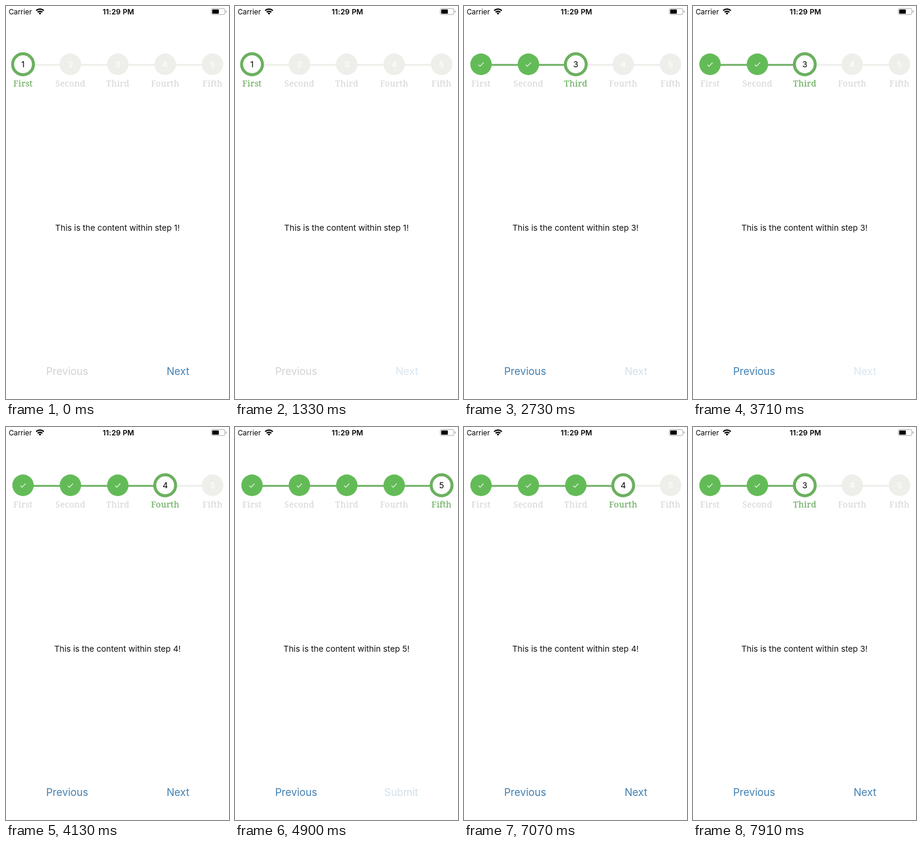
Recreate the animation shown at these times as an HTML page. Size 372 px wide and 654 px high, loop 8000 ms.

```html
<!DOCTYPE html>
<html lang="en">
<head>
<meta charset="utf-8">
<title>Progress steps</title>
<style>
  html, body { margin: 0; width: 100%; height: 100%; overflow: hidden; background: #fff; }
  svg { display: block; width: 100%; height: 100%; font-family: Inter, Roboto, sans-serif; }
  text { text-anchor: middle; }
  .status { font-size: 11.8px; text-anchor: start; }
  .clock { font-size: 12px; font-weight: 600; letter-spacing: .2px; }
  .content { font-size: 13.77px; fill: #111; }
  .button { font-size: 17.2px; fill: #417fb1; }
  .button.disabled { fill: #d2d2d2; }

  .line { fill: #eeeeea; }
  .line.done { fill: #6bae60; }
  .dot { fill: #eeeeea; }
  .number { font-size: 13.7px; font-weight: 600; fill: #fbfbf9; }
  .label { font-family: "Noto Serif", serif; font-size: 14px; letter-spacing: .35px; fill: #d3d3d3; }
  .check { fill: none; stroke: #fff; stroke-width: 1.1; visibility: hidden; }

  .active .dot { fill: #fff; stroke: #6bb05f; stroke-width: 5; }
  .active .number { fill: #000; font-weight: 400; }
  .active .label { fill: #6dae62; stroke: #6dae62; stroke-width: .2; }
  .done .dot { fill: #63bb57; }
  .done .number { visibility: hidden; }
  .done .check { visibility: visible; }
</style>
</head>
<body>
<svg viewBox="0 0 372 654">
  <text class="status" x="4.5" y="13.6">Carrier</text>
  <g fill="none" stroke="#000" stroke-width="2.2">
    <path d="M50.3 7.8a9 9 0 0 1 12.8 0M52.8 10.4a5.5 5.5 0 0 1 7.8 0"/>
    <path d="M56.7 14.4l-2.2-2.3a3.1 3.1 0 0 1 4.4 0z" fill="#000" stroke="none"/>
  </g>
  <text class="clock" x="187.6" y="13.6">11:29 PM</text>
  <rect x="342.5" y="4.2" width="22.6" height="10" rx="2.4" fill="none" stroke="#a5a5a5"/>
  <rect x="344" y="5.8" width="11" height="6.9" rx="1"/>
  <path d="M366.6 7.3q1.6.6 1.6 1.9t-1.6 1.9z" fill="#a5a5a5"/>

  <g id="lines"></g>
  <g id="steps"></g>

  <text class="content" id="content" x="186" y="373.6"></text>
  <text class="button" id="previous" x="102" y="614">Previous</text>
  <text class="button" id="next" y="614"></text>
</svg>
<script>
const LOOP = 8000;
const FADE = 250;
const PRESSED = 0.2;
const RELEASE_LEAD = 40;
const DOT_RADIUS = 17.9;
const RING_RADIUS = 17.4;
const names = ['First', 'Second', 'Third', 'Fourth', 'Fifth'];

// Each tap dims its button, then changes the step on release.
const taps = [
  { button: 'next', press: 1330, change: 1470, step: 2 },
  { button: 'next', press: 2450, change: 2730, step: 3 },
  { button: 'next', press: 3710, change: 3920, step: 4 },
  { button: 'next', press: 4690, change: 4900, step: 5 },
  { button: 'previous', press: 6300, change: 6510, step: 4 },
  { button: 'previous', press: 7350, change: 7630, step: 3 }
];

const byId = id => document.getElementById(id);
const content = byId('content');
const buttons = { previous: byId('previous'), next: byId('next') };
const stepX = i => 28.4 + 79.05 * i;

byId('lines').innerHTML = names.slice(1).map((_, i) =>
  `<rect class="line" x="${stepX(i) + 17}" y="96.5" width="45" height="3"/>`).join('');

byId('steps').innerHTML = names.map((name, i) => `
  <g transform="translate(${stepX(i)} 97)">
    <circle class="dot"/>
    <text class="number" y="5">${i + 1}</text>
    <path class="check" d="M-4.4 .6l2.8 2.7L4.2-2.9"/>
    <text class="label" y="37">${name}</text>
  </g>`).join('');

const lines = [...byId('lines').children];
const steps = [...byId('steps').children];
let shownStep = 0;

function showStep(step) {
  if (step === shownStep) return;
  shownStep = step;
  steps.forEach((el, i) => {
    const state = i + 1 < step ? 'done' : i + 1 === step ? 'active' : '';
    el.setAttribute('class', state);
    el.firstElementChild.setAttribute('r', state === 'active' ? RING_RADIUS : DOT_RADIUS);
  });
  lines.forEach((el, i) => el.classList.toggle('done', i + 1 < step));
  content.textContent = `This is the content within step ${step}!`;
  buttons.previous.classList.toggle('disabled', step === 1);
  buttons.next.textContent = step === 5 ? 'Submit' : 'Next';
  buttons.next.setAttribute('x', step === 5 ? 277.4 : 286.9);
}

const easeInOut = p => p < 0.5 ? 2 * p * p : 1 - 2 * (1 - p) ** 2;

function opacityAt(name, time) {
  const tap = taps.findLast(t => t.button === name && time >= t.press);
  if (!tap) return 1;
  const progress = (time - tap.change + RELEASE_LEAD) / FADE;
  return PRESSED + (1 - PRESSED) * easeInOut(Math.min(1, Math.max(0, progress)));
}

function render(time) {
  const last = taps.findLast(t => time >= t.change);
  showStep(last ? last.step : 1);
  for (const name in buttons) buttons[name].style.opacity = opacityAt(name, time);
}

const start = performance.now();
function tick() {
  render((performance.now() - start) % LOOP);
  requestAnimationFrame(tick);
}
tick();
</script>
</body>
</html>
```
